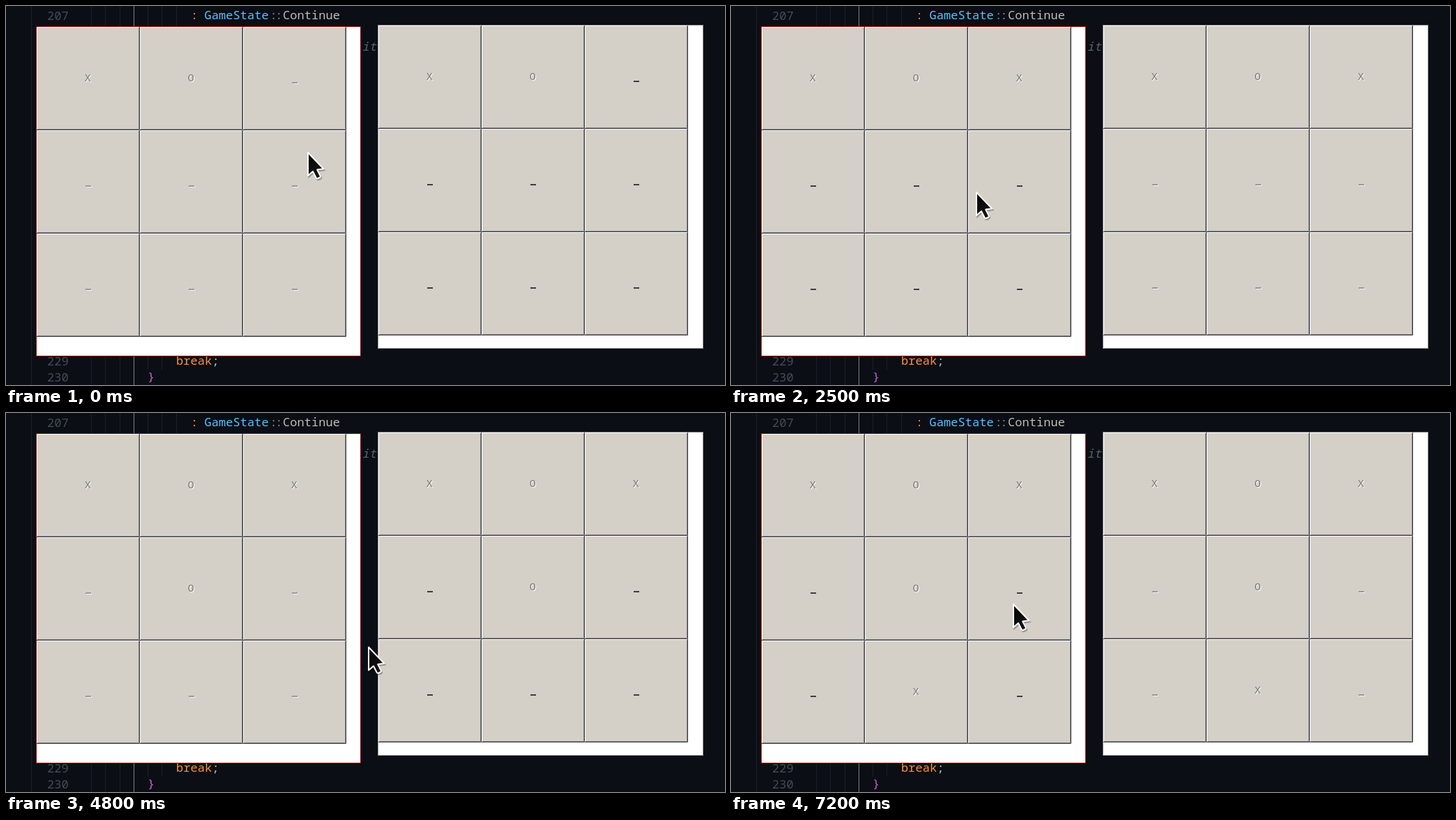
An HTML page that plays this animation: 1031 px wide and 543 px high, repeating every 8 s.

```html
<!DOCTYPE html>
<html lang="en">
<head>
<meta charset="utf-8">
<title>Tic-tac-toe in two windows</title>
<style>
  html, body { margin: 0; width: 100%; height: 100%; overflow: hidden; background: #0b0e14; }
  svg { display: block; position: absolute; left: 0; top: 0; }
  .code { font: 17px "Noto Sans Mono", "DejaVu Sans Mono", monospace; white-space: pre; }
  .num { fill: #454b55; }
  .key { fill: #ff8f40; }
  .type { fill: #59c2ff; }
  .plain { fill: #bfbdb6; }
  .op { fill: #85878a; }
  .note { fill: #5a616b; font-style: italic; }
  .brace { fill: #c964d6; }
  .guide { stroke: #1c2028; }
  .guide.on { stroke: #7d8086; }
  .frame { fill: #fff; stroke: #8f8f8f; }
  .focus .frame { stroke: #a80c0c; }
  .face { fill: #d4d0c8; }
  .lt { fill: none; stroke: #fff; }
  .rb { fill: none; stroke: #3c3c40; }
  .in { fill: none; stroke: #85858a; }
  .down .lt { stroke: #3c3c40; }
  .down .rb { stroke: #fff; }
  .down .in { stroke: #d4d0c8; }
  .down .label { transform: translate(1px, 1px); }
  .mark { font: 15px "Liberation Mono", monospace; text-anchor: middle; }
  .ink { fill: #000; }
  .shade { display: none; fill: #fff; }
  .off .ink { fill: #7c7c7c; }
  .off .shade { display: inline; }
</style>
</head>
<body>
<svg id="stage" width="1031" height="543" viewBox="0 0 1031 543">
  <defs>
    <linearGradient id="body" x1="0" y1="0" x2="1" y2="1">
      <stop offset="0" stop-color="#000"/>
      <stop offset="1" stop-color="#1c1c1c"/>
    </linearGradient>
  </defs>
  <rect width="1031" height="543" fill="#0b0e14"/>
  <g id="guides"></g>
  <g class="code">
    <text class="num" x="59" y="20">207</text>
    <text class="key" x="265" y="19">:</text>
    <text class="type" x="284.5" y="19" letter-spacing=".04">GameState</text>
    <text class="op" x="378.5 386.2" y="19">::</text>
    <text class="plain" x="397" y="19" letter-spacing=".04">Continue</text>
    <text class="brace" x="203" y="41.5">}</text>
    <text class="note" x="510.5" y="64">it</text>
    <text class="num" x="59" y="515">229</text>
    <text class="key" x="244" y="514" letter-spacing=".04">break<tspan class="plain">;</tspan></text>
    <text class="num" x="59" y="538">230</text>
    <text class="brace" x="203" y="536.5">}</text>
  </g>
  <g id="windows"></g>
  <g id="cursor">
    <path d="M0 0V33L7 27L11.6 36Q12.6 37.6 14 37L17 35.6Q18.4 34.8 17.7 33.4L13.2 24.6L22.3 23.2Z"
      transform="translate(1.2 2)" fill="#000" stroke="#000" stroke-width="2" opacity=".28"/>
    <path d="M0 0V33L7 27L11.6 36Q12.6 37.6 14 37L17 35.6Q18.4 34.8 17.7 33.4L13.2 24.6L22.3 23.2Z"
      fill="url(#body)" stroke="#fff" stroke-width="2" stroke-linejoin="round"/>
  </g>
</svg>
<script>
const LOOP = 8000, TICK = 100, SIZE = 148;
const byId = id => document.getElementById(id);

function add(parent, tag, attrs) {
  const el = document.createElementNS("http://www.w3.org/2000/svg", tag);
  for (const k in attrs) el.setAttribute(k, attrs[k]);
  return parent.appendChild(el);
}

function guide(x, y1, y2, cls = "guide") {
  add(byId("guides"), "line", { x1: x + .5, x2: x + .5, y1, y2, class: cls });
}
guide(36, 0, 543);
[122, 142, 163].forEach(x => guide(x, 0, 543));
guide(183, 0, 543, "guide on");
[203, 223, 244].forEach(x => guide(x, 0, 29));
[203, 223].forEach(x => guide(x, 502, 521));

function makeCell(parent, x, y) {
  const g = add(parent, "g", { transform: `translate(${x} ${y})` });
  const e = SIZE - .5, i = SIZE - 1.5;
  add(g, "rect", { width: SIZE, height: SIZE, class: "face" });
  add(g, "path", { d: `M1 ${i}H${i}V1`, class: "in" });
  add(g, "path", { d: `M.5 ${SIZE}V.5H${SIZE}`, class: "lt" });
  add(g, "path", { d: `M0 ${e}H${e}V0`, class: "rb" });
  const label = add(g, "g", { class: "label" });
  const layers = ["shade", "ink"].map((cls, n) => {
    const d = n ? 0 : 1;
    return {
      dash: add(label, "rect", { x: 70 + d, y: 79.3 + d, width: 8, height: 1.4, class: cls }),
      text: add(label, "text", { x: 73.3 + d, y: 78 + d, class: "mark " + cls })
    };
  });
  return (mark, enabled, down) => {
    g.setAttribute("class", (enabled ? "" : "off") + (down ? " down" : ""));
    for (const { dash, text } of layers) {
      dash.setAttribute("visibility", mark ? "hidden" : "visible");
      text.textContent = mark;
    }
  };
}

function makeWindow(x, y, width, height) {
  const g = add(byId("windows"), "g", {});
  add(g, "rect", { x: x + .5, y: y + .5, width: width - 1, height: height - 1, class: "frame" });
  const cells = Array.from({ length: 9 }, (_, n) =>
    makeCell(g, x + 1 + n % 3 * SIZE, y + 1 + Math.floor(n / 3) * SIZE));
  return { g, cells };
}
const windows = [makeWindow(43, 29, 466, 473), makeWindow(533, 27, 467, 464)];

// Each click: press time, release time, window, cell, mark
const clicks = [
  [-2, -1, 1, 0, "X"],
  [-2, -1, 0, 1, "O"],
  [1000, 1100, 1, 2, "X"],
  [3900, 4100, 0, 4, "O"],
  [5200, 5300, 1, 7, "X"]
];

const ease = {
  hold: () => 0,
  in: u => u * u,
  out: u => 1 - (1 - u) * (1 - u),
  both: u => u * u * (3 - 2 * u)
};

// Cursor stops: time, x, y, easing towards the next stop
const path = [
  [0, 433, 210, "both"],
  [700, 885, 117, "hold"],
  [1200, 885, 117, "in"],
  [1400, 692, 198, "out"],
  [1800, 206, 266, "hold"],
  [2200, 206, 265.5, "hold"],
  [2500, 352, 267, "out"],
  [2800, 436, 269, "hold"],
  [3200, 436, 269, "both"],
  [3800, 298, 265, "hold"],
  [4400, 298, 265, "both"],
  [5200, 742, 406, "hold"],
  [5600, 742, 406, "both"],
  [5800, 740.5, 406, "hold"],
  [5900, 740.5, 406, "in"],
  [6100, 458, 398, "out"],
  [6400, 391, 391, "hold"],
  [6600, 391, 391, "both"],
  [7200, 405, 274, "hold"],
  [LOOP, 405, 274, "hold"]
];

function cursorAt(t) {
  const n = path.findIndex(p => p[0] > t);
  const [t0, x0, y0, kind] = path[n - 1], [t1, x1, y1] = path[n];
  const u = ease[kind]((t - t0) / (t1 - t0));
  return [x0 + (x1 - x0) * u, y0 + (y1 - y0) * u];
}

function draw(t) {
  const [x, y] = cursorAt(t);
  byId("cursor").setAttribute("transform", `translate(${x} ${y})`);

  const board = Array(9).fill("");
  const done = clicks.filter(c => c[1] <= t);
  done.forEach(c => board[c[3]] = c[4]);
  const turn = done.length % 2 ? 0 : 1;
  const held = clicks.find(c => c[0] <= t && t < c[1]);
  const focus = x < 521 ? 0 : 1;

  windows.forEach((w, i) => {
    w.g.setAttribute("class", i === focus ? "focus" : "");
    w.cells.forEach((set, n) =>
      set(board[n], i === turn && !board[n], !!held && held[2] === i && held[3] === n));
  });
}

const start = performance.now();
let last = -1;
function frame() {
  const t = Math.floor((performance.now() - start) % LOOP / TICK) * TICK;
  if (t !== last) draw(last = t);
  requestAnimationFrame(frame);
}
frame();
</script>
</body>
</html>
```
